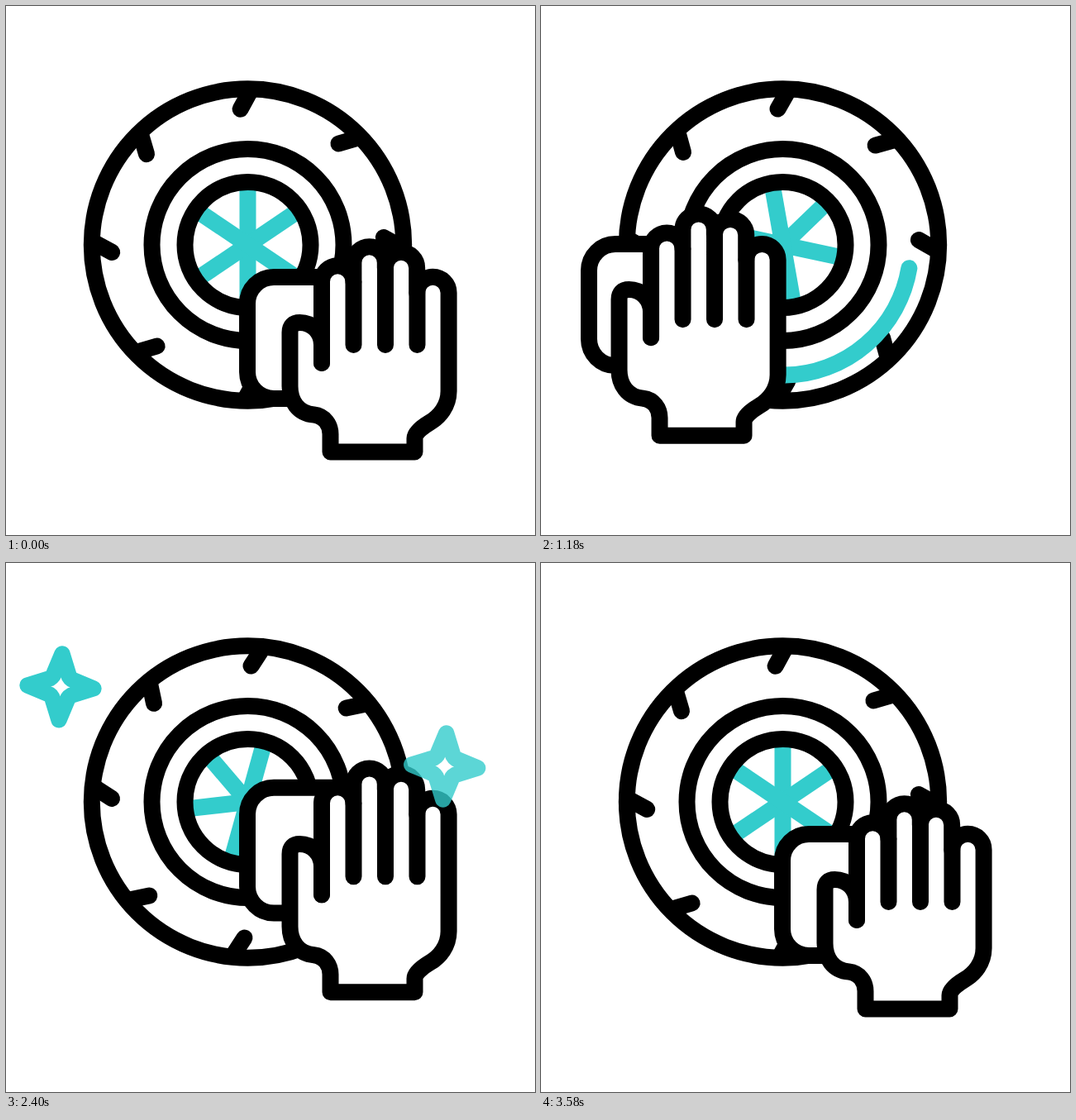
Animation of 640x640 px, one loop 3600 ms. Source, as an HTML page:

```html
<!DOCTYPE html>
<html lang="en">
<head>
<meta charset="utf-8">
<title>Wheel polishing</title>
<style>
  html, body { margin: 0; width: 100%; height: 100%; overflow: hidden; background: #fff; }
  svg { display: block; width: 100vw; height: 100vh; }
  .ink { fill: none; stroke: #000; stroke-width: 20; stroke-linejoin: round; }
  .teal { fill: none; stroke: #33cccc; stroke-width: 20; stroke-linejoin: round; }
  .star { stroke-width: 19.4; }
  .solid { fill: #fff; }
  .round { stroke-linecap: round; }
</style>
</head>
<body>
<svg viewBox="0 0 640 640">
  <g transform="translate(292.5 289)">
    <g id="wheel"></g>
    <circle class="ink" r="188.7"/>
    <circle class="ink" r="116"/>
    <circle class="ink" r="76"/>
    <path id="shine" class="teal round"/>
  </g>
  <path id="cloth" class="ink solid"/>
  <path id="hand" class="ink solid"/>
  <path id="slots" class="ink round"/>
  <path id="starA" class="teal star"/>
  <path id="starB" class="teal star"/>
</svg>
<script>
const LOOP = 3600;
const el = id => document.getElementById(id);
const set = (id, name, value) => el(id).setAttribute(name, value);

// Smooth 0..1 ramp between times a and b
const ramp = (t, a, b) => {
  const x = Math.min(1, Math.max(0, (t - a) / (b - a)));
  return x * x * (3 - 2 * x);
};

function build() {
  let parts = '';
  for (const a of [-90, -34, 34])
    parts += `<path class="teal" d="M-74 0H74" transform="rotate(${a})"/>`;
  for (let i = 0; i < 8; i++)
    parts += `<path class="ink round" d="M164.3 -8.9L187 3.5" transform="rotate(${i * 45})"/>`;
  el('wheel').innerHTML = parts;
  const star = 'M0 -40L9.7 -13.2Q11 -11 13.2 -9.7L40 0L13.2 9.7Q11 11 9.7 13.2' +
    'L0 40L-9.7 13.2Q-11 11 -13.2 9.7L-40 0L-13.2 -9.7Q-11 -11 -9.7 -13.2Z';
  set('starA', 'd', star);
  set('starB', 'd', star);
}

function drawShine(t) {
  const from = 9.5;
  const to = 10 + 158.5 * (ramp(t, 0, 770) - ramp(t, 1560, 2640));
  const at = deg => {
    const a = deg * Math.PI / 180;
    return `${155 * Math.cos(a)} ${155 * Math.sin(a)}`;
  };
  set('shine', 'd', to > from + 1 ? `M${at(from)}A155 155 0 0 1 ${at(to)}` : '');
  set('shine', 'transform', `translate(0 ${11 * ramp(t, 800, 1995)})`);
}

function drawHand(t) {
  const u = ramp(t, 0, 770) - ramp(t, 1030, 1995);      // sweep to the left
  const lift = ramp(t, 2110, 2450) - ramp(t, 2450, 2890);
  const bend = Math.pow(Math.max(0, u), 1.3);
  const dx = -0.5 - 266.5 * u;
  const dy = 44.4 * u - 38.9 * u * u - 33.5 * u ** 3 - 21.5 * lift;
  const tip = -22 * bend - 24 * lift;                   // finger tips
  const gap = -12 * bend - 11 * lift;                   // ends of the finger gaps

  const finger = (x, y) => `V${y + tip}a19.2 19.2 0 0 1 38.4 0`;
  const thumb = 395 + tip;
  set('hand', 'd',
    `M382.5 ${432 + gap}` +
    finger(382.5, 333.5) + finger(421, 310.5) + finger(459.5, 317) + finger(498, 347) +
    'V466C536 484 525 497 513 504C503 510 495 517 495 523V539.5H393V518' +
    'C393 507 386 496 373 494.5C354 493 344 478 344 460' +
    `V${thumb}q0 -12 12 -12c15 0 26.5 12 26.5 27Z`);
  set('slots', 'd',
    `M382.5 ${334 + tip}V${432 + gap}` +
    [[421, 334], [459.5, 317], [498, 347]]
      .map(([x, y]) => `M${x} ${y + tip}V${410 + gap}`).join(''));
  for (const id of ['hand', 'slots']) set(id, 'transform', `translate(${dx} ${dy})`);

  set('cloth', 'd',
    `M410 328H324.5a32 32 0 0 0 -32 32V${443 + 5 * lift}a32 32 0 0 0 32 32H365`);
  set('cloth', 'transform', `translate(${dx * 0.94} ${dy - 22 * bend - 38 * lift})`);
}

function drawStar(id, x, y, tilt, opacity) {
  set(id, 'transform', `translate(${x} ${y}) rotate(${tilt})`);
  set(id, 'opacity', opacity);
}

function draw(t) {
  const spin = 50 * ramp(t, 0, 800) - 90.5 * ramp(t, 1007, 2384) + 40.5 * ramp(t, 2400, 3300);
  set('wheel', 'transform', `rotate(${spin})`);
  drawShine(t);
  drawHand(t);

  const a = ramp(t, 1580, 2800);
  drawStar('starA', 66, 272 - 163 * a, 1.3 + 2 * a,
    ramp(t, 1560, 1700) - ramp(t, 2690, 2810));
  const b = ramp(t, 2140, 3260);
  drawStar('starB', 532 - 31 * Math.pow(b, 1.6), 269 - 167 * b, 4.5 - 11.9 * b,
    ramp(t, 2310, 2438) - ramp(t, 3250, 3370));
}

build();
const start = performance.now();
function tick() {
  draw((performance.now() - start) % LOOP);
  requestAnimationFrame(tick);
}
tick();
</script>
</body>
</html>
```
